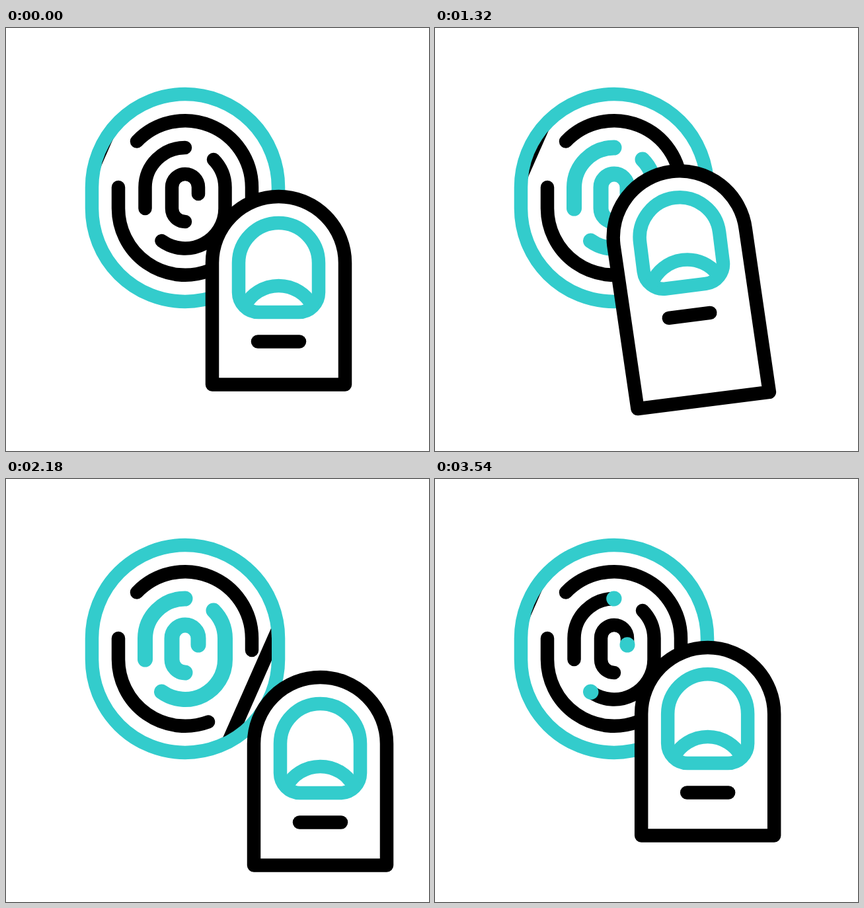
An HTML page for the animation above (3600 ms loop, 640x640 px).

```html
<!DOCTYPE html>
<html lang="en">
<head>
<meta charset="utf-8">
<title>Fingerprint scan</title>
<style>
  html, body { margin: 0; width: 100%; height: 100%; overflow: hidden; background: #fff; }
  svg { display: block; width: 100vw; height: 100vh; }
  path { fill: none; stroke: #000; stroke-width: 20.5; stroke-linecap: round; stroke-linejoin: round; }
  .teal { stroke: #33cccc; }
  .wide { stroke-width: 23; }
  #slash { stroke-linecap: butt; }
  #skin { fill: #fff; }
</style>
</head>
<body>
<svg viewBox="0 0 640 640">
  <defs>
    <clipPath id="inside"><rect x="140" y="110" width="262" height="294" rx="131"/></clipPath>
    <path id="ring" style="stroke:inherit"/>
  </defs>
  <path class="teal" d="M130 241a141 141 0 0 1 282 0v32a141 141 0 0 1-282 0z"/>
  <path d="M170 241V273A101 101 0 0 0 306 367.5"/>
  <path d="M198 171.5A101 101 0 0 1 372 241V259"/>
  <g id="ridges"></g>
  <g clip-path="url(#inside)"><path id="slash" d="M88.3 65L-88.3 465"/></g>
  <g id="rays"></g>
  <g id="finger">
    <path id="skin"/>
    <path class="teal" d="M-60.5 0A60.5 60.5 0 0 1 60.5 0V44.5A30 30 0 0 1 30.5 74.5H-30.5A30 30 0 0 1-60.5 44.5Z"/>
    <path class="teal" d="M-50 63A58 58 0 0 1 50 63"/>
    <path d="M-31.5 119H31.5"/>
  </g>
</svg>
<script>
const LOOP = 3600;
const $ = id => document.getElementById(id);
$('ring').remove();

function addPath(parent, d, cls) {
  const p = document.createElementNS('http://www.w3.org/2000/svg', 'path');
  p.setAttribute('d', d);
  p.setAttribute('class', cls);
  p.setAttribute('pathLength', 100);
  parent.append(p);
  return p;
}

// Each ridge is drawn in black with a teal copy that is trimmed in and out.
const ridges = [
  'M210.5 273V241A60.5 60.5 0 0 1 271 181',
  'M314 199A60.5 60.5 0 0 1 331.5 241V273A60.5 60.5 0 0 1 235.5 322',
  'M271 293A20 20 0 0 1 251 273V241A20 20 0 0 1 291 241V251'
].map(d => {
  addPath($('ridges'), d, '');
  return addPath($('ridges'), d, 'teal wide');
});

const rays = [
  'M391.5 99L401 69.5', 'M425 128L449 111', 'M441.5 171.5L469.5 174',
  'M110.5 121L92 100', 'M93 163.5L64 160', 'M97 208.5L70 223.5'
].map(d => addPath($('rays'), d, 'teal'));

// Smooth progress of t from a to b, held at both ends.
function ease(t, a, b) {
  const u = Math.min(1, Math.max(0, (t - a) / (b - a)));
  return u * u * (3 - 2 * u);
}
const mix = (a, b, p) => a + (b - a) * p;

function trim(path, from, to) {
  const len = (to - from) * 100;
  path.style.display = len > 0.01 ? '' : 'none';
  path.style.strokeDasharray = len + ' 1000';
  path.style.strokeDashoffset = -from * 100;
}

// Finger poses: centre of the tip, and how far it is pressed (0 to 1).
const REST = [412.5, 355.5, 0], PRESS = [268.5, 236, 1], AWAY = [475.5, 400.5, 0];
const MOVES = [
  [160, 655, REST, PRESS],
  [1070, 1578, PRESS, AWAY],
  [3247, 3550, AWAY, REST]
];

function drawFinger(t) {
  const [a, b, from, to] = MOVES.filter(m => t >= m[0]).pop() || MOVES[0];
  const p = ease(t, a, b);
  const [x, y, press] = from.map((v, i) => mix(v, to[i], p));
  const stretch = press * (1.5 - 0.5 * press);
  const len = 184 + 103 * stretch, skew = 7.8 * stretch;
  $('skin').setAttribute('d',
    `M-100.5 0A100.5 100.5 0 0 1 100.5 0L${100.5 + skew} ${len}H${skew - 100.5}Z`);
  $('finger').setAttribute('transform', `translate(${x} ${y}) rotate(${-14.1 * press})`);
}

function draw(t) {
  drawFinger(t);
  for (const r of rays) trim(r, ease(t, 900, 1010), ease(t, 750, 895));
  for (const r of ridges) trim(r, ease(t, 3247, 3550), ease(t, 760, 1000));
  const sweep = ease(t, 1240, 2440) - ease(t, 2513, 3240);
  $('slash').setAttribute('transform', `translate(${mix(108, 434, sweep)} 0)`);
}

function tick() {
  draw(performance.now() % LOOP);
  requestAnimationFrame(tick);
}
tick();
</script>
</body>
</html>
```
